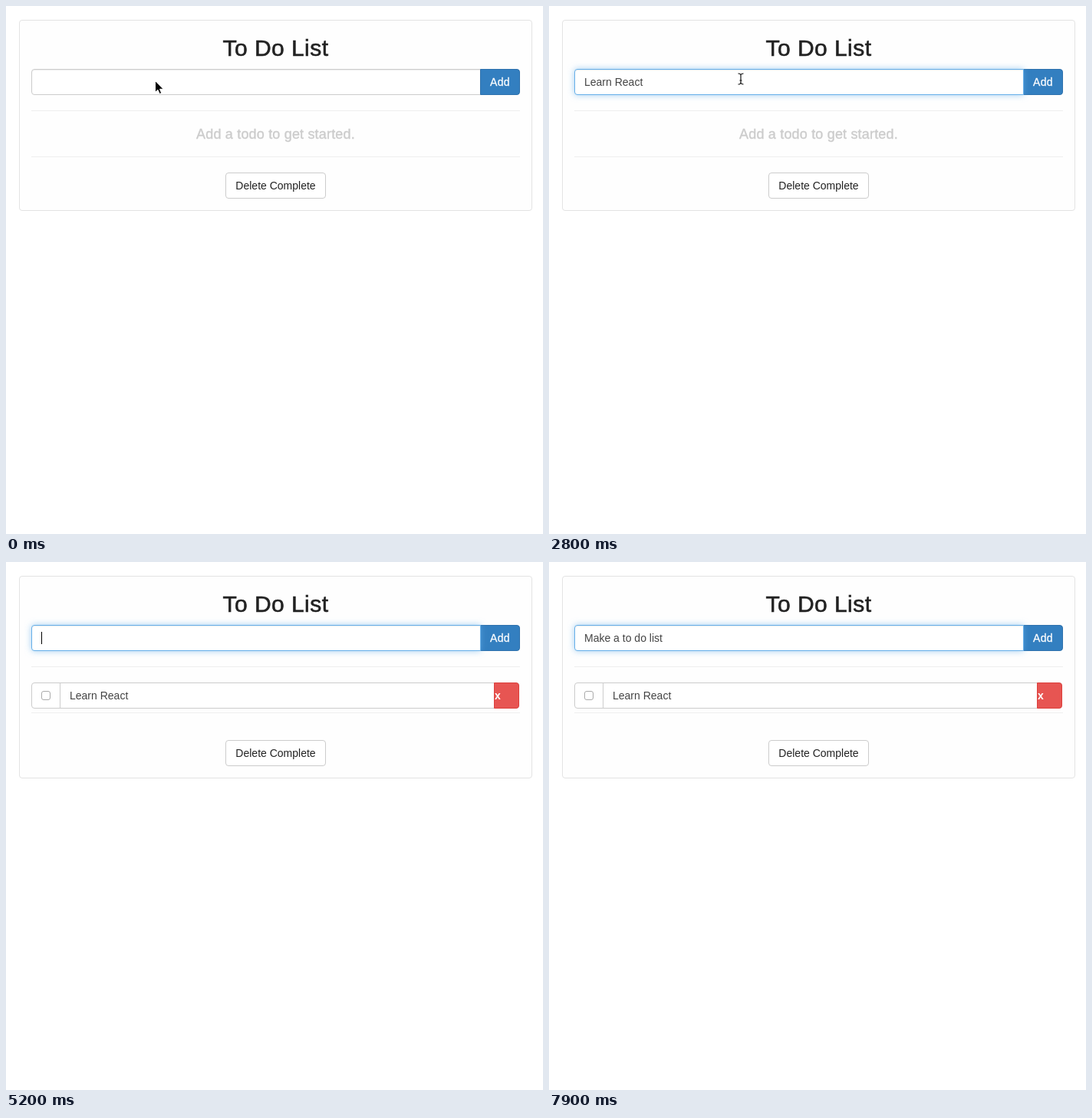
An HTML page for the animation above (8 s loop, 700 by 688 pixels).

```html
<!DOCTYPE html>
<html lang="en">
<head>
<meta charset="utf-8">
<title>To Do List</title>
<style>
html, body { margin: 0; width: 700px; height: 688px; overflow: hidden; background: #fff; }
body { position: relative; font: 14px/32px "Liberation Sans", Arial, sans-serif; color: #222; }
div, svg { position: absolute; box-sizing: border-box; }
div { white-space: pre; }
.box { height: 34px; border: 1px solid #ccc; background: #fff; }
.btn { text-align: center; border-radius: 4px; }
.line { left: 33px; width: 637px; height: 1px; background: #eee; }
.mid { left: 17px; width: 669px; text-align: center; }
#card { left: 17px; top: 18px; width: 669px; border: 1px solid #e3e3e3; border-radius: 4px; background: #fefefe; }
#title { top: 39px; font-size: 30px; letter-spacing: .45px; -webkit-text-stroke: .6px #222; }
#hint { top: 151px; font-size: 18px; color: #ccc; letter-spacing: .18px; -webkit-text-stroke: .4px #ccc; }
#field { left: 33px; top: 82px; width: 586px; padding-left: 12px; border-radius: 4px 0 0 4px; color: #444; }
#caret { display: inline-block; width: 1px; height: 16px; margin-right: -1px; background: #000; vertical-align: -3px; }
#add { left: 618px; top: 82px; width: 52px; border-radius: 0 4px 4px 0; color: #fff; letter-spacing: .3px; -webkit-text-stroke: .3px #fff; }
#del { left: 286px; width: 131px; }
#item { left: 33px; top: 157px; width: 636px; border-radius: 4px; padding-left: 49px; color: #444; }
#split { left: 36px; top: 0; width: 1px; height: 32px; background: #ccc; }
#check { left: 12px; top: 10px; width: 12px; height: 12px; border: 1px solid #aaa; border-radius: 3px; }
#x { right: -1px; top: -1px; width: 33px; border-color: #dc403c; border-radius: 0 4px 4px 0; background: #e75552; color: #fff; font-weight: bold; }
svg { left: 0; top: 0; z-index: 4; overflow: visible; }
</style>
</head>
<body>
<div id="card"></div>
<div id="title" class="mid">To Do List</div>
<div id="field" class="box"><span id="text"></span><span id="caret"></span></div>
<div id="add" class="box btn">Add</div>
<div class="line" style="top:136px"></div>
<div id="hint" class="mid">Add a todo to get started.</div>
<div id="item" class="box">Learn React<div id="split"></div><div id="check"></div><div id="x" class="box">x</div></div>
<div class="line" style="top:196px"></div>
<div id="del" class="box btn">Delete Complete</div>
<svg id="mouse" width="1" height="1">
  <path id="arrow" d="M0 0V15L3.4 11.8 5.8 17 8.2 16 6 10.8H10.6Z" fill="#000" stroke="#fff"/>
  <path id="beam" d="M-3.5 -7Q0 -7 0 -4.5Q0 -7 3.5 -7M0 -5V5M-3.5 7Q0 7 0 4.5Q0 7 3.5 7M-1.5 2H1.5" fill="none" stroke="#111" stroke-width="1.2"/>
  <path id="hand" d="M-3.5 2V-6Q-3.5 -7.5 -2.3 -7.5T-1 -6V-2Q.3 -3.5 1.5 -1.8Q3 -3 4 -1.2Q6 -2 6 .5V3L4.5 6V8H-2.5V6L-6.5 1Q-6.5 -1 -5 -.3Z" fill="#fff" stroke="#000"/>
</svg>
<script>
const el = id => document.getElementById(id);
const show = (id, on) => el(id).style.display = on ? '' : 'none';
const ramp = (t, start) => Math.min(1, Math.max(0, (t - start + 100) / 300));
const mix = (a, b, p) => a.map((v, i) => v + (b[i] - v) * p);

const CLICK = 3300, ADDED = 3400, REFOCUS = 5000;
// Key times in tenths of a second
const words = [
  ['Learn React', [15, 16, 18, 19, 21, 22, 24, 24, 25, 26, 27]],
  ['Make a to do list', [55, 56, 57, 58, 58, 61, 62, 64, 65, 68, 71, 72, 73, 74, 75, 76, 77]]
];
const caretOn = [[200, 500], [800, 1000], [1300, 2800], [5100, 7800]];
const path = [[2600, 195, 98], [2700, 205, 97], [2800, 250, 95], [2900, 340, 95],
  [3000, 455, 98], [3100, 570, 102], [3200, 632, 105]];

function mouseAt(t) {
  if (t < 100) return [194.5, 97.5];
  if (t <= path[0][0]) return path[0].slice(1);
  const i = path.findIndex(p => p[0] >= t);
  if (i < 0) return path[path.length - 1].slice(1);
  const [a, b] = [path[i - 1], path[i]];
  return mix(a, b, (t - a[0]) / (b[0] - a[0])).slice(1);
}

function draw(t) {
  const added = t >= ADDED;
  const [word, keys] = words[+added];
  el('text').textContent = word.slice(0, keys.filter(k => k * 100 <= t).length);
  show('caret', caretOn.some(([a, b]) => t >= a && t < b));

  const focus = ramp(t, 100) - ramp(t, CLICK) + ramp(t, REFOCUS);
  const field = el('field').style;
  field.borderColor = `rgb(${mix([204, 204, 204], [102, 175, 233], focus)})`;
  field.boxShadow = `inset 0 1px 1px rgba(0,0,0,.075), 0 0 8px rgba(102,175,233,${.6 * focus})`;

  const pressed = t >= CLICK && t < REFOCUS;
  const dark = t >= 3200 && t < REFOCUS;
  const add = el('add').style;
  add.background = dark ? '#25629a' : '#337fc0';
  add.borderColor = dark ? '#204d80' : '#2e71ad';
  add.boxShadow = pressed ? '0 0 2px 2px #6db2f5' : 'none';
  field.zIndex = pressed || t < 100 ? 1 : 3;
  add.zIndex = 2;

  show('hint', !added);
  show('item', added);
  el('card').style.height = (added ? 264 : 249) + 'px';
  el('del').style.top = (added ? 232 : 217) + 'px';

  const [x, y] = mouseAt(t);
  el('mouse').style.transform = `translate(${x}px, ${y}px)`;
  show('mouse', t < 1500 || t >= 2700 && t < 4200);
  show('arrow', t < 100);
  show('beam', t >= 100 && x < 619);
  show('hand', x >= 619);
}

function tick() {
  draw(Math.floor(performance.now() % 8000 / 100) * 100);
  requestAnimationFrame(tick);
}
tick();
</script>
</body>
</html>
```
